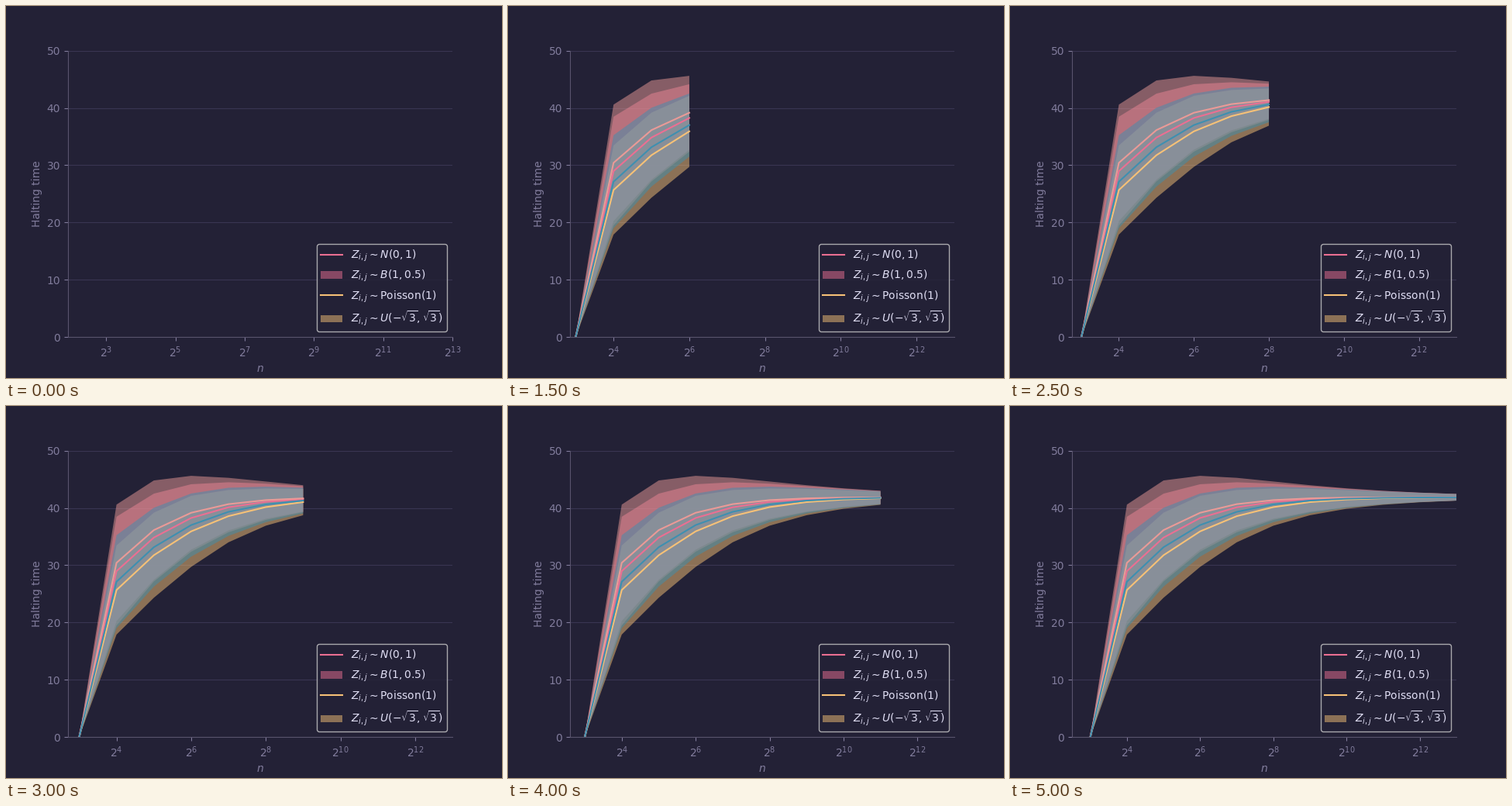
A matplotlib script for the animation above (10000 ms loop, 640x480 px).

```python
import matplotlib.pyplot as plt
import numpy as np
from matplotlib.animation import FuncAnimation

BG, TEXT, SUBTLE = "#232136", "#e0def4", "#817c9c"
EDGE, GRID = "#59546d", "#393552"
FIRST, LAST = 3, 13          # exponents of n
STEP_MS, STEPS = 500, 20
LIMIT = 41.87                # halting time for large n

# colour, gap to the limit at n = 16, rate at which it closes,
# n below which the spread levels off, sharpness of that bend
SERIES = [
    ("#eb6f92", 12.9, 0.575, 14, 1),
    ("#f6c177", 16.2, 0.44, 44, 3),
    ("#ea9a97", 11.45, 0.66, 24, 3),
    ("#3e8fb0", 14.75, 0.495, 25, 1),
]

LABELS = [
    r"$Z_{i,j} \sim N(0, 1)$",
    r"$Z_{i,j} \sim B(1, 0.5)$",
    r"$Z_{i,j} \sim \mathrm{Poisson}(1)$",
    r"$Z_{i,j} \sim U(-\sqrt{3}, \sqrt{3})$",
]

plt.rcParams.update({
    "font.family": "DejaVu Sans",
    "figure.facecolor": BG, "axes.facecolor": BG,
    "axes.edgecolor": EDGE, "axes.labelcolor": SUBTLE,
    "xtick.color": SUBTLE, "ytick.color": SUBTLE,
    "text.color": TEXT, "grid.color": GRID,
    "axes.spines.top": False, "axes.spines.right": False,
    "axes.axisbelow": True,
})

fig, ax = plt.subplots(figsize=(6.4, 4.8), dpi=100)


def mean_time(n, gap, rate):
    j = np.log2(n) - 4
    return LIMIT - gap * np.exp(-rate * j - 0.03 * j ** 2)


def spread_time(n, knee, sharp):
    return 52 / np.sqrt(n) * (1 + (knee / n) ** sharp) ** (-0.5 / sharp)


def update(step):
    k = min(step, LAST - FIRST)
    ax.clear()
    n = 2.0 ** np.arange(FIRST, FIRST + k + 1)
    for color, gap, rate, knee, sharp in SERIES:
        mean = mean_time(n, gap, rate)
        spread = spread_time(n, knee, sharp)
        mean[0] = spread[0] = 0
        ax.plot(n, mean, color=color)
        ax.fill_between(n, mean - spread, mean + spread,
                        facecolor=color, alpha=0.5, linewidth=0)

    # the left margin is 5% of the exponents shown so far
    left = FIRST - 0.05 * k if k else 1.9
    ax.set_xscale("log", base=2)
    ax.set_xlim(2.0 ** left, 2.0 ** LAST)
    ax.set_xticks(2.0 ** np.arange(4 if k else 3, LAST + 1, 2))
    ax.set_ylim(0, 50)
    ax.set_xlabel("$n$")
    ax.set_ylabel("Halting time")
    ax.grid(axis="y")
    ax.legend(LABELS, loc="lower right")
    return []


anim = FuncAnimation(fig, update, init_func=lambda: [], frames=STEPS,
                     interval=STEP_MS, repeat=True, repeat_delay=0)
plt.show()
```
